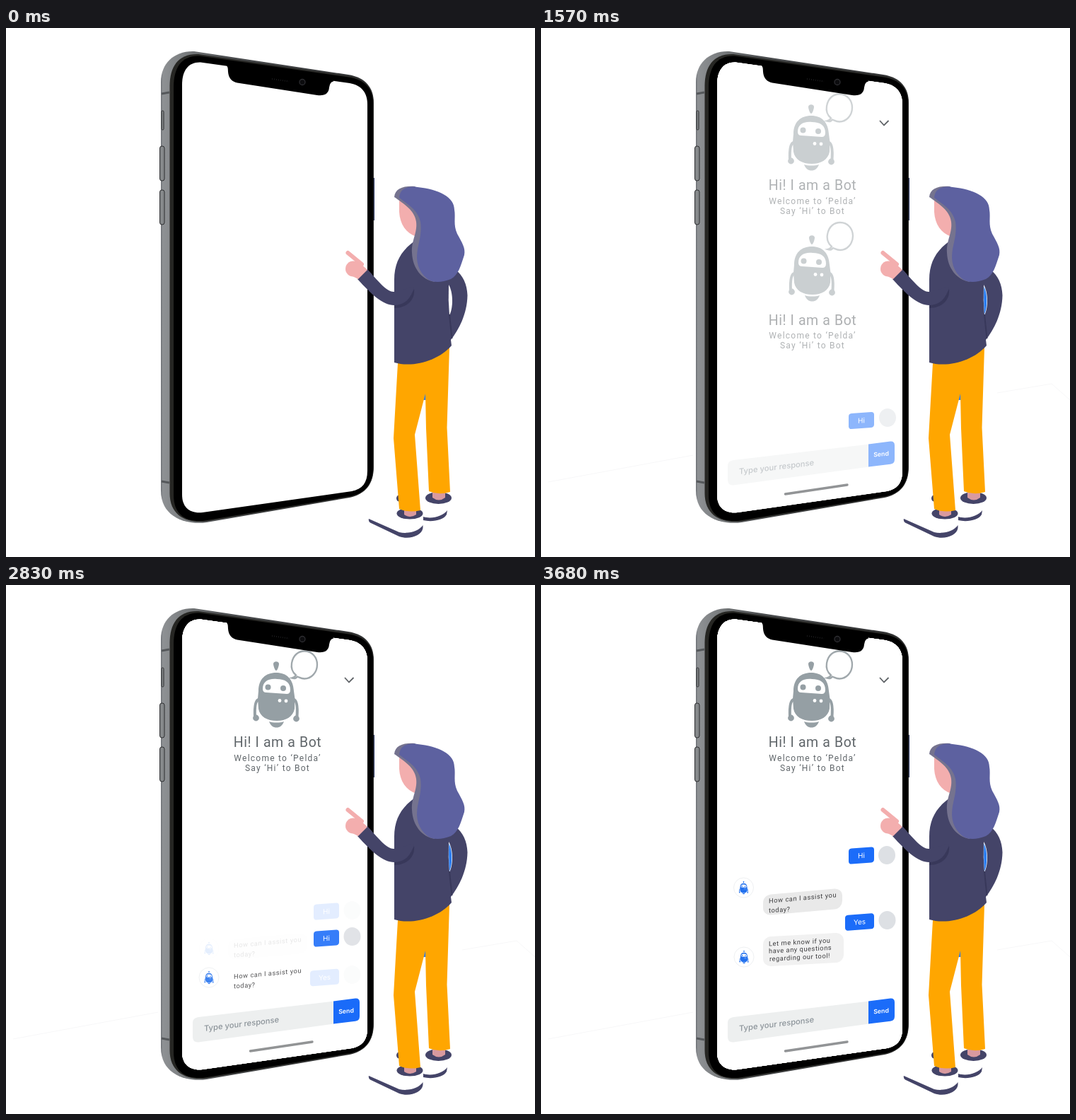
Recreate the animation shown at these times as an HTML page. Size 748x748 px, loop 4410 ms.

```html
<!DOCTYPE html>
<html lang="en">
<head>
<meta charset="utf-8">
<title>Chat bot on a phone</title>
<style>
html, body { margin: 0; width: 100%; height: 100%; overflow: hidden; background: #fff; }
svg { display: block; width: 100vw; height: 100vh; }

.title { font: 400 19.5px Roboto, sans-serif; letter-spacing: .6px; text-anchor: middle; }
.sub { font: 400 12px Roboto, sans-serif; letter-spacing: 1.25px; text-anchor: middle; fill: #60666a; }
.talk { font: 400 9.3px Roboto, sans-serif; letter-spacing: .55px; fill: #3d3d3f; }
.label { font: 400 10px Inter, sans-serif; text-anchor: middle; fill: #fff; }
.field { font: 500 11.2px Inter, sans-serif; fill: #8c949a; }
.send { font: 600 8.8px Inter, sans-serif; text-anchor: middle; fill: #fff; }

/* Each scene fades in over the one below, in eight steps */
.s1, .s2, .s3, .s4, .s5, .s6, .pop { opacity: 0; animation: 4410ms infinite; }
.s1 { animation-name: s1; }
.s2 { animation-name: s2; }
.s3 { animation-name: s3; }
.s4 { animation-name: s4; }
.s5 { animation-name: s5; }
.s6 { animation-name: s6; }
.pop { animation-name: pop; }
@keyframes s1 { 0%, 3.83% { opacity: 0; animation-timing-function: steps(8); } 9.27%, 100% { opacity: 1; } }
@keyframes s2 { 0%, 19.03% { opacity: 0; animation-timing-function: steps(8); } 24.47%, 100% { opacity: 1; } }
@keyframes s3 { 0%, 32.86% { opacity: 0; animation-timing-function: steps(8); } 38.3%, 100% { opacity: 1; } }
@keyframes s4 { 0%, 47.37% { opacity: 0; animation-timing-function: steps(8); } 52.81%, 100% { opacity: 1; } }
@keyframes s5 { 0%, 63.47% { opacity: 0; animation-timing-function: steps(8); } 68.91%, 100% { opacity: 1; } }
@keyframes s6 { 0%, 77.98% { opacity: 0; animation-timing-function: steps(8); } 83.42%, 100% { opacity: 1; } }
@keyframes pop { 0%, 78.66% { opacity: 0; animation-timing-function: step-start; } 78.67%, 100% { opacity: 1; } }
</style>
</head>
<body>
<svg viewBox="0 0 748 748">
<defs>
  <linearGradient id="metal" gradientUnits="userSpaceOnUse" x1="218" x2="520" y1="0" y2="0">
    <stop offset="0" stop-color="#5c5f66"/>
    <stop offset=".012" stop-color="#8e9194"/>
    <stop offset=".1" stop-color="#7d8082"/>
    <stop offset=".3" stop-color="#4c4e50"/>
    <stop offset="1" stop-color="#2e2f30"/>
  </linearGradient>

  <path id="screen" fill="#fff" d="M249 80C249 60 258 48 275 48.5L486 78C503 81 511 92 511 108V626C511 643 504 652 489 655L278 685C260 687 249 678 249 660Z"/>

  <g id="base">
    <use href="#screen"/>
    <path d="M479 131L485 137.5L491.5 131" fill="none" stroke="#606468" stroke-width="1.8"/>
    <path d="M345.5 659L433 646" stroke="#929496" stroke-width="3.4" stroke-linecap="round"/>
  </g>

  <g id="robot">
    <path d="M379 297C378.5 292 387.5 292 387 297C386.5 301 384.5 306 383 306C381.5 306 379.5 301 379 297Z"/>
    <path d="M357 346L358 335C358 318 368 309 383 309C398 309 407 318 408 335L409.5 346L409 360C407 371 397 377 384 377C370 377 360 371 358 360Z"/>
    <path d="M373 378C378 380 389 380 394 378C392 384 388 386.5 383.5 386.5C379 386.5 375 384 373 378Z"/>
    <path d="M358 347Q352 349 353 371M408 347Q414 349 412.5 371" fill="none" stroke="currentColor" stroke-width="4"/>
    <circle cx="354.5" cy="373" r="4.4"/>
    <circle cx="411.5" cy="374" r="4.4"/>
    <path fill="#fff" d="M364 332C364 322 371 317 384 318C396 318 403 323 403 333Q403 339 398 339L369 337Q364 337 364 332Z"/>
    <circle cx="371.5" cy="329.5" r="4"/>
    <circle cx="393" cy="331" r="4"/>
    <g fill="#fff"><circle cx="388" cy="348.5" r="2.4"/><circle cx="397" cy="349" r="2.4"/></g>
  </g>

  <path id="speech" fill="none" stroke="#a0a8ac" stroke-width="2.3" d="M411 309C405 304 404 298 405 292C407 280 415 275 423 275C434 275 441 284 441 294C441 305 433 314 423 314C418 314 416 312 413 311C411 314 408 314 405 313C409 312 410 311 411 309Z"/>

  <g id="welcome">
    <text class="sub" x="384" y="439">Welcome to ‘Pelda’</text>
    <text class="sub" x="384" y="453">Say ‘Hi’ to Bot</text>
  </g>

  <g id="form">
    <path fill="#edefef" d="M272 611L464 588.5V620.5L272 646.5Q264 647 264 639V619Q264 612 272 611Z"/>
    <path fill="#1b6cf9" d="M463 588.5L494 584.5Q500 584 500 590V610Q500 616 494 616.7L463 620.5Z"/>
    <text class="field" transform="translate(280 631) skewY(-6.8)">Type your response</text>
    <text class="send" transform="translate(481 605.5) skewY(-5)">Send</text>
  </g>

  <g id="chat">
    <use href="#base"/>
    <g color="#959fa4" fill="#959fa4"><use href="#robot" x="-1" y="-185"/></g>
    <use href="#speech" x="-1" y="-181.5"/>
    <text class="title" x="384" y="229" fill="#60666a">Hi! I am a Bot</text>
    <use href="#welcome" y="-190.5"/>
    <use href="#form"/>
  </g>

  <g id="hi" transform="skewY(-4.5)">
    <rect x="-18" y="-11" width="36" height="22" rx="4" fill="#1b6cf9"/>
    <text class="label" y="3.6">Hi</text>
  </g>
  <g id="yes" transform="skewY(-4.5)">
    <rect x="-20.5" y="-11" width="41" height="22" rx="4" fill="#1b6cf9"/>
    <text class="label" y="3.6">Yes</text>
  </g>
  <ellipse id="user" rx="12" ry="13" fill="#dde0e4"/>

  <g id="avatar">
    <circle r="14" fill="#fff" stroke="#eef0f2"/>
    <g color="#2371ee" fill="#2371ee"><use href="#robot" transform="scale(.2) translate(-383 -340)"/></g>
  </g>

  <rect id="askBox" x="-56" y="-14.5" width="112" height="29" rx="11" transform="translate(370 448) skewY(-5)"/>
  <g id="ask" class="talk">
    <text transform="translate(322 450) skewY(-5.2)">How can I assist you</text>
    <text transform="translate(322 463.5) skewY(-4)">today?</text>
  </g>
  <rect id="replyBox" x="-57" y="-21" width="114" height="42" rx="11" fill="#f1f1f1" transform="translate(371 515.5) skewY(-3)"/>
  <g id="reply" class="talk">
    <text transform="translate(322 510.5) skewY(-3.2)">Let me know if you</text>
    <text transform="translate(322 520.8) skewY(-3.2)">have any questions</text>
    <text transform="translate(323 532) skewY(-3.2)">regarding our tool!</text>
  </g>
</defs>

<!-- floor -->
<path class="s1" d="M10 642L215 604M645 516L722 503L748 526" fill="none" stroke="#f7f7f8"/>

<!-- phone body -->
<path fill="url(#metal)" d="M219 76C219 50 238 32 266 33L484 66C508 70 520 84 520 106V620C520 645 508 659 486 664L284 699C258 703 219 694 219 654Z"/>
<path fill="#262623" d="M231.500 82C231.500 54 244 36 272 37L484 68C508 72 519.500 85 519.500 107V620C519.500 645 508 659 486 663L284 697.500C256 701 231.500 690 231.500 658Z"/>
<path d="M237 84C237 56 248 38.500 274 39.500L484 69.500C508 73 519 86 519 108V620C519 644 508 658 486 662L284 696C256 700 237 690 237 660Z"/>
<path d="M220 93L231 91M220 641L231 643" stroke="#55585b" stroke-width="3"/>
<g fill="#85888a" stroke="#2b2c2e">
  <rect x="220" y="117" width="3" height="27" rx="1.5"/>
  <rect x="217.5" y="167" width="6.5" height="49" rx="3"/>
  <rect x="217.5" y="229" width="6.5" height="49" rx="3"/>
</g>
<path d="M520.5 212V272" stroke="#24305c"/>
<use href="#screen"/>

<!-- scenes -->
<g class="s1">
  <use href="#base"/>
  <g color="#9aa3a8" fill="#9aa3a8"><use href="#robot"/></g>
  <use href="#speech"/>
  <text class="title" x="384" y="419.5" fill="#7b7f88">Hi! I am a Bot</text>
</g>
<g class="s2">
  <use href="#base"/>
  <g color="#959fa4" fill="#959fa4"><use href="#robot"/></g>
  <use href="#speech"/>
  <text class="title" x="384" y="419.5" fill="#5c6165">Hi! I am a Bot</text>
  <use href="#welcome"/>
</g>
<g class="s3">
  <use href="#chat"/>
  <use href="#hi" x="453" y="555"/>
  <use href="#user" x="490" y="551"/>
</g>
<g class="s4">
  <use href="#chat"/>
  <use href="#hi" x="453" y="499.5"/>
  <use href="#user" x="489.5" y="497"/>
  <use href="#avatar" x="287" y="555"/>
  <use href="#ask" y="107"/>
</g>
<g class="s5">
  <use href="#chat"/>
  <use href="#hi" x="453" y="461.5"/>
  <use href="#user" x="489.5" y="460"/>
  <use href="#avatar" x="287" y="514"/>
  <use href="#askBox" y="63" fill="#f1f1f1"/>
  <use href="#ask" y="63"/>
  <use href="#yes" x="450.5" y="555"/>
  <use href="#user" x="489.5" y="551"/>
</g>
<use class="pop" href="#reply" y="25"/>
<g class="s6">
  <use href="#chat"/>
  <use href="#hi" x="453" y="382.5"/>
  <use href="#user" x="489" y="382"/>
  <use href="#avatar" x="286.5" y="428"/>
  <use href="#askBox" fill="#e9e9e9"/>
  <use href="#ask"/>
  <use href="#yes" x="450.5" y="476.5"/>
  <use href="#user" x="489.5" y="474"/>
  <use href="#avatar" x="287" y="526"/>
  <use href="#replyBox"/>
  <use href="#reply"/>
</g>

<!-- notch -->
<path d="M311 52Q314 54 314 62Q315 75 327 77.5L440 95Q456 97 457 84Q458 76 463 75.5V68L311 46Z"/>
<circle cx="419" cy="76.5" r="4" fill="#0c0c0e" stroke="#2e2e32" stroke-width="1.3"/>
<path d="M376 72L400 75.5" stroke="#1c1c1e" stroke-width="2" stroke-dasharray="1 2"/>

<!-- shoes -->
<g fill="#444468">
  <circle cx="557" cy="665" r="5"/>
  <path d="M590 691C602 695 618 690 624 682L623 688C619 696 602 699 590 696Z"/>
  <ellipse cx="611.5" cy="664.5" rx="18.5" ry="8.5"/>
  <path fill="#fff" d="M514 694L553 682H589V704L557 713Z"/>
  <path d="M513 694L556 713C570 716 584 711 589.500 703V707C588 718 570 724 556 719L515 699.500Q512 697 513 694Z"/>
  <ellipse cx="571" cy="686.5" rx="18.5" ry="8"/>
</g>
<path fill="#d99a9f" d="M603 655H621V664Q612 671 603 664ZM563 680H580V688Q571 694 563 688Z"/>

<!-- trousers -->
<path fill="#2a7df0" d="M588 526L592 514L596 526Z"/>
<path fill="#ffa600" d="M554 474L627 452L623.5 565L628 656Q612 661 598 655L594 566L593 517L578 575L586 682Q570 686 556 680L548 580Z"/>

<!-- jacket -->
<path fill="#444468" d="M578 301C560 314 549 330 549 356V473C576 481 612 470 630 449L629 441C640 427 652 405 652.5 378C652 362 646 350 636 342L610 300Z"/>
<path fill="#fff" d="M626 363C632.5 374 632.5 396 627 406Q625 385 626 363Z"/>
<path class="s1" fill="#2a7df0" d="M626.5 365.5C631.5 376 631.5 395 627 404.5Q625.5 385 626.5 365.5Z"/>
<path d="M627 405L630.5 439" stroke="#38385a" stroke-width="2"/>
<path fill="#38385a" d="M577 369C579 385 566 396 549 396V390C562 389 571 381 577 369Z"/>
<path fill="#444468" d="M511 341C525 356 538 374 549 373L577 366C573 383 563 392 549 392C533 392 517 377 497 355Z"/>

<!-- hand -->
<path d="M483.5 318L503 334" stroke="#f3aeae" stroke-width="6" stroke-linecap="round"/>
<path fill="#f3aeae" d="M496 328L511 342L498 355L490 351Z"/>
<circle cx="491" cy="340.5" r="11" fill="#f3aeae"/>

<!-- head -->
<path fill="#f3aeae" d="M556 242V260C557 278 566 290 580 295L588 265L570 246Z"/>
<path fill="#75738f" d="M549 239C550 227 562 223 578 224L600 240L606 359C588 356 575 340 574 318C573 300 582 290 580 274C578 258 563 249 549 239Z"/>
<path fill="#5d61a0" d="M556 240C557 227 567 223 582 225C612 228 634 239 634 257C636 268 632 278 638 291C645 304 650 311 648 321C643 336 640 349 629 355C614 361 602 360 595 354C583 344 579 330 582 313C585 298 588 288 586 274C582 257 569 250 556 240Z"/>
</svg>
</body>
</html>
```
